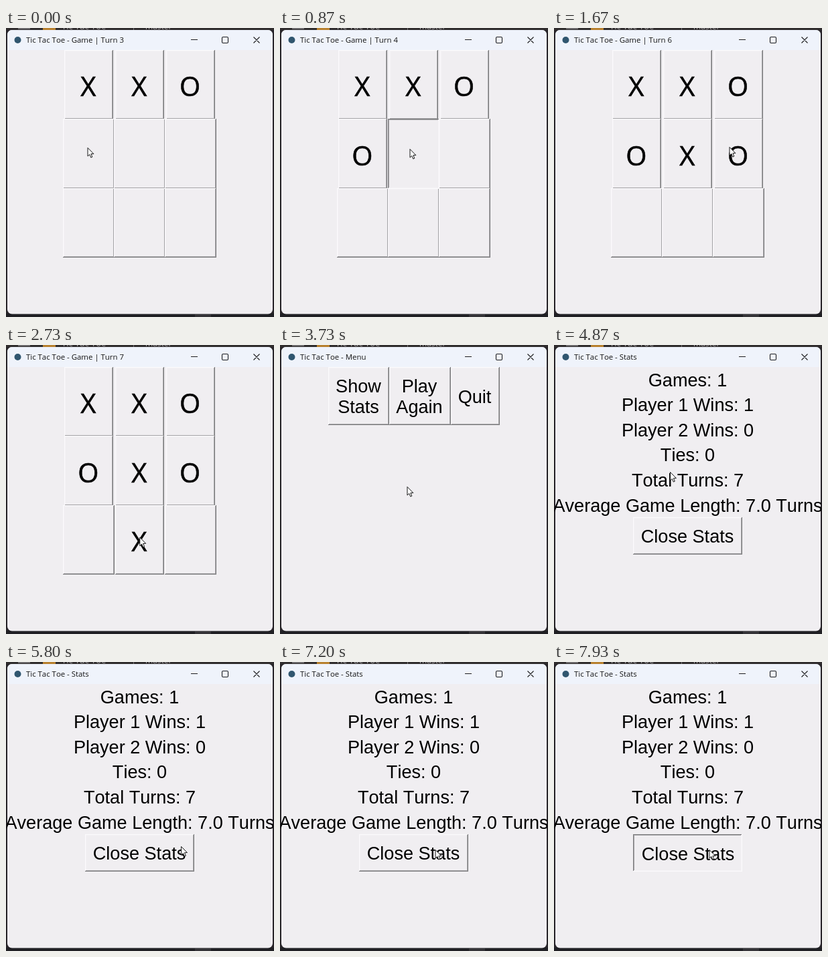
Animation of 400x433 px, one loop 8 s. Source, as an HTML page with a canvas:

```html
<!DOCTYPE html>
<html lang="en">
<head>
<meta charset="utf-8">
<title>Tic Tac Toe</title>
<style>
html, body { margin: 0; width: 100%; height: 100%; overflow: hidden; background: #29262a; }
canvas { display: block; }
</style>
</head>
<body>
<canvas id="stage" width="400" height="433"></canvas>
<script>
const ctx = document.getElementById('stage').getContext('2d');
const LOOP = 8000;
const FACE = '#f0eef1';
const UI = '"Open Sans", "Noto Sans", sans-serif';
const ARIAL = '27.1px "Liberation Sans", Arial, sans-serif';
ctx.fontKerning = 'none';

const MENU_AT = 2870, STATS_AT = 4300;

// cell column, row, mark, press time, release time
const MOVES = [
  [0, 0, 'X', -2, -1], [1, 0, 'X', -2, -1], [2, 0, 'O', -2, -1],
  [0, 1, 'O', 290, 400],
  [1, 1, 'X', 870, 970],
  [2, 1, 'O', 1380, 1480],
  [1, 2, 'X', 2360, 2470]
];

// time, x, y of the pointer tip
const PATH = [
  [0, 122, 179], [420, 122, 180], [800, 194, 181], [990, 194, 181],
  [1320, 262, 178], [1720, 262, 178], [2250, 199, 287], [2950, 200, 288],
  [3500, 192, 226], [3730, 190, 212], [4080, 120, 84], [4340, 120, 84],
  [4870, 173.5, 190], [5100, 176, 194], [5650, 261.5, 276], [6250, 262, 276],
  [6950, 232, 281], [8000, 232, 281]
];

const STATS = [
  'Games: 1', 'Player 1 Wins: 1', 'Player 2 Wins: 0', 'Ties: 0',
  'Total Turns: 7', 'Average Game Length: 7.0 Turns'
];

function box(x, y, w, h, color) {
  ctx.fillStyle = color;
  ctx.fillRect(x, y, w, h);
}

function text(str, x, y, font, align = 'center', color = '#000') {
  ctx.font = font;
  ctx.textAlign = align;
  ctx.fillStyle = color;
  ctx.fillText(str, x, y);
}

function bevel(x, y, w, h, pressed) {
  const light = ['#fbfafc', '#f4f2f5'], dark = ['#7c7c7e', '#a3a2a5'];
  const [tl, br] = pressed ? [dark, light] : [light, dark];
  box(x, y, w, h, FACE);
  for (let i = 0; i < 2; i++) {
    box(x + i, y + i, w - 2 * i, 1, tl[i]);
    box(x + i, y + i, 1, h - 2 * i, tl[i]);
    box(x + i, y + h - 1 - i, w - 2 * i, 1, br[i]);
    box(x + w - 1 - i, y + i, 1, h - 2 * i, br[i]);
  }
}

function button(x, y, w, h, lines, cx, baseline, pressed) {
  bevel(x, y, w, h, pressed);
  const d = pressed ? 1 : 0;
  lines.forEach((s, i) => text(s, cx + d, baseline + d + i * 31, ARIAL));
}

function desktop() {
  box(0, 0, 400, 433, '#29262a');
  box(0, 0, 400, 3, '#302d2e');
  box(0, 428, 400, 5, '#202024');
  box(282, 429, 24, 4, '#353438');
  box(18, 0, 18, 2, '#6c6a6c');
  box(55, 0, 19, 3, '#b8812f');
  text('Tic Tac Toe', 83, 2, '13px ' + UI, 'left', '#aaa8aa');
  text('master', 208, 2, '12px ' + UI, 'left', '#aaa8aa');
  box(190, 0, 1, 3, '#777577');
}

function frame(title) {
  ctx.save();
  ctx.beginPath();
  ctx.roundRect(2, 3, 396, 425.5, 7);
  ctx.clip();
  box(2, 3, 396, 426, FACE);
  box(2, 3, 396, 30, '#eff3fb');
  ctx.restore();

  ctx.fillStyle = '#30566f';
  ctx.beginPath();
  ctx.arc(17.5, 18, 5, 0, Math.PI * 2);
  ctx.fill();
  text(title, 30, 22, '11.4px ' + UI, 'left', '#151515');

  ctx.strokeStyle = '#1c1c1e';
  ctx.lineWidth = 1.1;
  ctx.beginPath();
  ctx.moveTo(276, 17.5);
  ctx.lineTo(286, 17.5);
  ctx.roundRect(322.5, 13.5, 9, 9, 1.5);
  ctx.moveTo(369.5, 13.5);
  ctx.lineTo(378.5, 22.5);
  ctx.moveTo(378.5, 13.5);
  ctx.lineTo(369.5, 22.5);
  ctx.stroke();
}

function mark(s, x, y) {
  text(s, x, y, '40px ' + UI);
  ctx.strokeStyle = '#000';
  ctx.lineWidth = 0.6;
  ctx.strokeText(s, x, y);
}

function board(t) {
  for (let r = 0; r < 3; r++) {
    const y = Math.floor(33 + 103.6 * r);
    const h = Math.floor(33 + 103.6 * (r + 1)) - y + 1;
    for (let c = 0; c < 3; c++) {
      const move = MOVES.find(m => m[0] === c && m[1] === r);
      const filled = move && t >= move[4];
      const pressed = move && t >= move[3] && !filled;
      const x = 85 + 76 * c;
      if (filled) {
        bevel(x + 2, y, 73, h, false);
        mark(move[2], 122.8 + 75.9 * c, 102 + 103.7 * r);
      } else {
        bevel(x, y, 77, h, pressed);
      }
    }
  }
}

function menu(t) {
  button(72, 33, 91, 87, ['Show', 'Stats'], 117, 71, t > 4180);
  button(163, 33, 92, 87, ['Play', 'Again'], 208, 71);
  button(255, 33, 73, 87, ['Quit'], 290.5, 86.5);
}

function stats(t) {
  ctx.save();
  ctx.beginPath();
  ctx.rect(1, 33, 398, 395);
  ctx.clip();
  STATS.forEach((s, i) => text(s, 199.5, 61.5 + 37.6 * i, ARIAL));
  ctx.restore();
  button(118, 258, 163, 56, ['Close Stats'], 199, 296, t >= 7700);
}

function pointer(t) {
  const i = Math.max(1, PATH.findIndex(p => p[0] > t));
  const [t0, x0, y0] = PATH[i - 1], [t1, x1, y1] = PATH[i];
  const k = (t - t0) / (t1 - t0), e = k * k * (3 - 2 * k);
  ctx.save();
  ctx.translate(x0 + (x1 - x0) * e, y0 + (y1 - y0) * e + 0.5);
  ctx.beginPath();
  [[0, 0], [0, 12.6], [2.8, 10], [4.8, 14.6], [6.8, 13.7], [4.9, 9.2], [8.9, 9.1]]
    .forEach(p => ctx.lineTo(...p));
  ctx.closePath();
  ctx.fillStyle = '#fff';
  ctx.fill();
  ctx.strokeStyle = '#161616';
  ctx.lineWidth = 1;
  ctx.stroke();
  ctx.restore();
}

function draw(now) {
  const t = now % LOOP;
  const turn = MOVES.filter(m => t >= m[4]).length;
  desktop();
  if (t < MENU_AT) {
    frame('Tic Tac Toe - Game | Turn ' + turn);
    board(t);
  } else if (t < STATS_AT) {
    frame('Tic Tac Toe - Menu');
    menu(t);
  } else {
    frame('Tic Tac Toe - Stats');
    stats(t);
  }
  pointer(t);
}

const start = performance.now();
function tick() {
  draw(performance.now() - start);
  requestAnimationFrame(tick);
}
tick();
</script>
</body>
</html>
```
